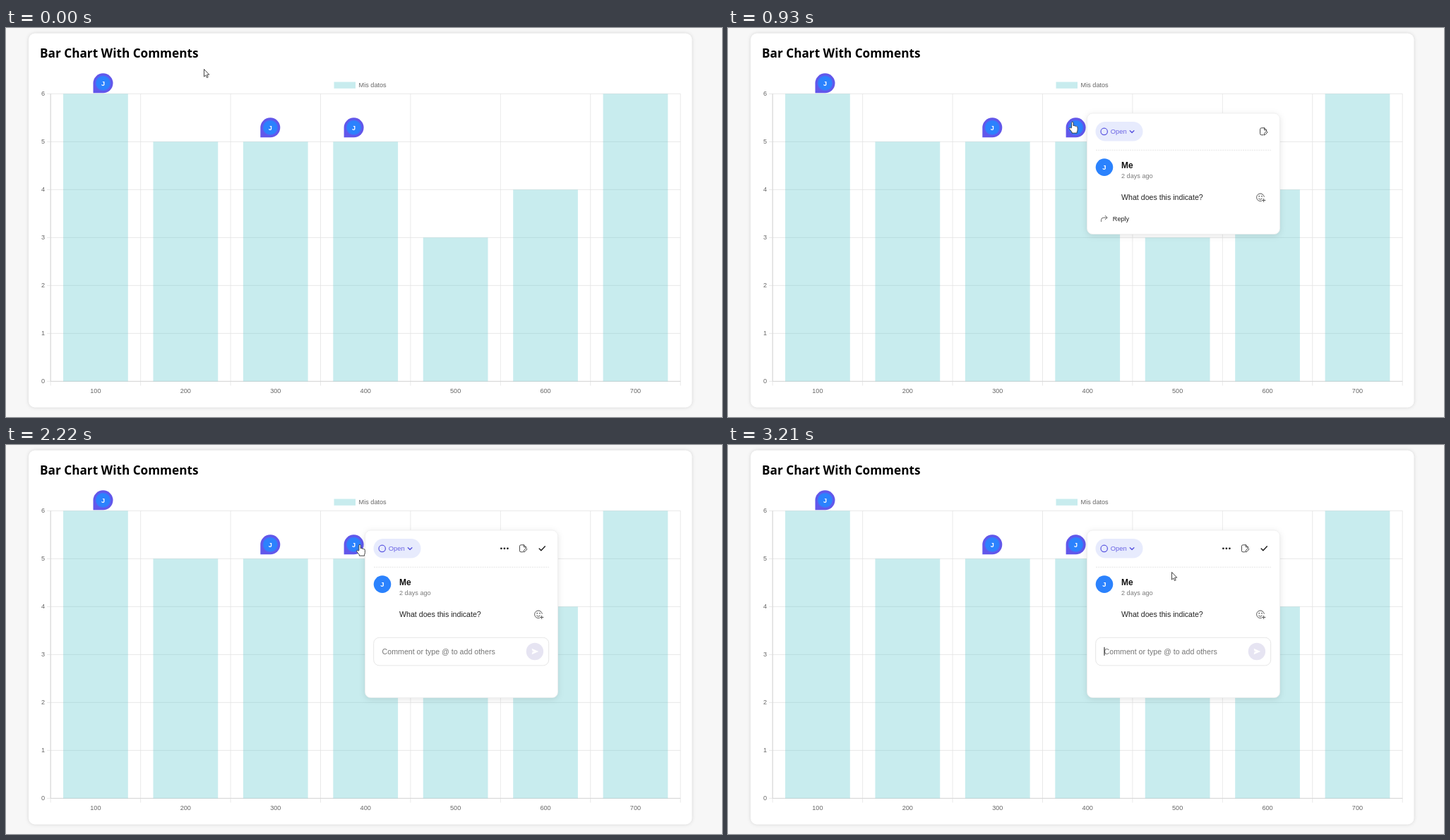
Recreate the animation shown at these times as an HTML page. Size 1014 by 552 pixels, loop 3240 ms.

```html
<!DOCTYPE html>
<html lang="en">
<head>
<meta charset="utf-8">
<title>Bar Chart With Comments</title>
<style>
  html, body { margin: 0; width: 100%; height: 100%; overflow: hidden; background: #f7f7f7; }
  svg { display: block; width: 1014px; height: 552px; font: 9.15px "Liberation Sans", Arial, sans-serif; }
  .card { filter: drop-shadow(0 0 2.5px rgba(0, 0, 0, .14)); }
  .panel { filter: drop-shadow(0 2px 4px rgba(0, 0, 0, .1)); }
  .title { font: bold 17.2px "Open Sans", "Noto Sans", sans-serif; }
  .body { font-size: 10.63px; }
  .line { fill: none; stroke-linecap: round; stroke-linejoin: round; }
  .initial { fill: #fff; font-weight: bold; text-anchor: middle; }
</style>
</head>
<body>
<svg viewBox="0 0 1014 552">
  <rect class="card" x="32" y="7.5" width="939.5" height="531" rx="9" fill="#fff"/>
  <text class="title" x="48" y="41.6">Bar Chart With Comments</text>
  <g id="chart"></g>
  <g id="pins"></g>

  <g id="popup">
    <rect id="panel" class="panel" x="508.5" y="121" width="273" rx="8" fill="#fff" stroke="#ececec" stroke-width=".8"/>
    <rect x="520.5" y="133" width="67" height="27.6" rx="13.8" fill="#e7ebfd"/>
    <g class="line" stroke="#5a55e0" stroke-width="1.2">
      <circle cx="532.7" cy="146.9" r="4.7"/>
      <path d="M569.3 145.7l2.8 2.8 2.8-2.8" stroke-width="1.4"/>
    </g>
    <text x="541.8" y="149.8" font-size="9.4" fill="#6a64e4">Open</text>
    <path d="M521 173.3H769" stroke="#e2e2e2" stroke-width=".9" stroke-dasharray="2 1.2"/>
    <circle cx="533" cy="197.6" r="12.3" fill="#2b82fd"/>
    <text class="initial" x="533" y="201" font-size="9.5">J</text>
    <text x="557" y="199" font-size="12" font-weight="bold" fill="#111">Me</text>
    <text x="557" y="213.4" fill="#7a7a7a">2 days ago</text>
    <text class="body" x="557" y="244.3" fill="#222">What does this indicate?</text>
    <g class="line" stroke="#555" stroke-width="1">
      <path d="M759.3 239.3a5.4 5.4 0 1 0-4 6.3M751.6 242.2q2.3 2.6 4.7 0M758.7 242.3v4.4M756.5 244.5h4.4"/>
      <path d="M752.2 238.6v.3M756 238.6v.3" stroke-width="1.5"/>
    </g>
    <g id="note" class="line" stroke="#444" stroke-width="1">
      <path d="M-.5 5h-2.3q-2 0-2-2v-6q0-2 2-2h4l3 3v1.2M1.2-5v3h3M.8 4.8l.4-2 3-3.2 1.5 1.4-3 3.3z"/>
    </g>
    <g id="collapsed">
      <path class="line" d="M528.5 274.5v-2q0-3.4 3.4-3.4h5M534.2 266.3l2.8 2.8-2.8 2.8" stroke="#666"/>
      <text x="544.8" y="273.6" fill="#222">Reply</text>
    </g>
    <g id="expanded">
      <g fill="#222">
        <circle cx="701.4" cy="146.8" r="1.4"/><circle cx="705.9" cy="146.8" r="1.4"/><circle cx="710.4" cy="146.8" r="1.4"/>
      </g>
      <path class="line" d="M755.2 147l2.6 2.7 5.4-5.8" stroke="#222" stroke-width="1.5"/>
      <rect x="520.7" y="273.3" width="248" height="39.6" rx="8" fill="#fff" stroke="#e6e6e6"/>
      <text class="body" x="532.6" y="296.8" fill="#757575">Comment or type @ to add others</text>
      <circle cx="748.9" cy="293" r="12.2" fill="#e6e4f2"/>
      <path d="M744.6 288.7l9.6 4.3-9.6 4.3 1-3.8 3.4-.5-3.4-.5z" fill="#fff"/>
      <path id="caret" d="M533 286.8v12" stroke="#111"/>
    </g>
  </g>

  <g id="cursor" fill="#fff" stroke="#333" stroke-width=".9" stroke-linejoin="round">
    <path id="arrow" d="M.5.5v10.6l2.4-2.2 1.6 3.6 1.7-.8-1.6-3.5h3.2z"/>
    <path id="hand" d="M-1.2 8V1q0-1.4 1.2-1.4T1.2 1v4.1q1.7-.8 2.3.5 1.5-.6 2 .6 1.8-.4 1.8 1.6v3.1q0 1.6-.8 2.9v1.7H-.7v-1.3L-4 10q-1-1.6-.1-2.2.9-.5 1.8.7z"/>
  </g>
</svg>
<script>
const $ = id => document.getElementById(id);
const show = (id, on) => $(id).setAttribute('display', on ? 'inline' : 'none');
const move = (id, x, y) => $(id).setAttribute('transform', `translate(${x} ${y})`);

function buildChart() {
  const left = 63.2, right = 955.2, base = 501.4, unit = 68;
  const values = [6, 5, 5, 5, 3, 4, 6];
  const step = (right - left) / values.length, barWidth = step * .72;
  const line = (d, color) => `<path d="${d}" fill="none" stroke="${color}" stroke-width=".8"/>`;
  let grid = '', bars = '', labels = '';
  for (let i = 0; i <= values.length; i++) {
    grid += line(`M${left + i * step} 93.4V507.5`, '#e4e4e4');
  }
  for (let v = 0; v <= 6; v++) {
    const y = base - v * unit;
    grid += line(`M58 ${y}H${right}`, '#e4e4e4');
    labels += `<text x="55.2" y="${y + 3}" text-anchor="end">${v}</text>`;
  }
  values.forEach((v, i) => {
    const center = left + (i + .5) * step;
    bars += `<rect x="${center - barWidth / 2}" y="${base - v * unit}" width="${barWidth}" height="${v * unit}"/>`;
    labels += `<text x="${center}" y="518" text-anchor="middle">${(i + 1) * 100}</text>`;
  });
  const axes = line(`M${left} 93.4V${base}H${right}`, '#d2d2d2');
  $('chart').innerHTML = `${grid}${axes}
    <g fill="rgb(75,192,197)" fill-opacity=".3">${bars}<rect x="464.5" y="76.5" width="30.5" height="9.3"/></g>
    <g fill="#666">${labels}<text x="499.6" y="83.8">Mis datos</text></g>`;
}

function buildPins() {
  $('pins').innerHTML = [[137.5, 78.3], [374.3, 141.3], [492.6, 141.3]].map(([x, y]) =>
    `<g transform="translate(${x} ${y})">
      <path d="M-14 14V0A14 14 0 1 1 0 14z" fill="#6257ea"/>
      <circle r="11" fill="#4a6cf6"/>
      <circle r="9.8" fill="#2b82fd"/>
      <text class="initial" y="3.3">J</text>
    </g>`).join('');
}

// Pointer path: time in ms, x, y
const approach = [[0, 280, 58], [450, 429, 107], [540, 447, 112.5], [810, 479, 128], [1080, 495, 139], [1230, 498, 141]];
const leave = [[2160, 498, 141], [2460, 543, 152], [2700, 588, 167.5], [3210, 628, 180]];

const slope = (a, b, axis) => (b[axis] - a[axis]) / (b[0] - a[0]);

// Cubic Hermite interpolation that comes to rest at the last point
function along(path, t, axis, startSlope) {
  const last = path.length - 1;
  if (t <= path[0][0]) return path[0][axis];
  if (t >= path[last][0]) return path[last][axis];
  const i = path.findIndex(p => p[0] > t) - 1;
  const tangent = k => k === 0 ? startSlope
    : k === last ? 0
    : (slope(path[k - 1], path[k], axis) + slope(path[k], path[k + 1], axis)) / 2;
  const [a, b] = [path[i], path[i + 1]];
  const span = b[0] - a[0], u = (t - a[0]) / span, w = 1 - u;
  return a[axis] * w * w * (1 + 2 * u) + b[axis] * u * u * (3 - 2 * u)
    + span * u * w * (tangent(i) * w - tangent(i + 1) * u);
}

function pointer(t) {
  const arriving = t < 1600, path = arriving ? approach : leave;
  return [1, 2].map(axis => along(path, t, axis, arriving ? slope(path[0], path[1], axis) : 0));
}

function draw(now) {
  const t = Math.floor(now % 3240 / 30) * 30;
  const [x, y] = pointer(t);
  const open = t >= 870, expanded = t >= 1590;
  const overPin = x > 480 && x < 507 && y > 128.5;
  const overPill = open && x > 520.5 && x < 587.5 && y < 160.5;

  show('popup', open);
  show('collapsed', !expanded);
  show('expanded', expanded);
  show('caret', Math.floor((t - 1680) / 540) % 2 === 0);
  $('panel').setAttribute('height', expanded ? 237.6 : 171.6);
  move('note', expanded ? 732.2 : 758.4, 146.8);

  move('cursor', x, y);
  show('hand', overPin || overPill);
  show('arrow', !overPin && !overPill);
}

buildChart();
buildPins();
const start = performance.now();
function tick() {
  draw(performance.now() - start);
  requestAnimationFrame(tick);
}
tick();
</script>
</body>
</html>
```
